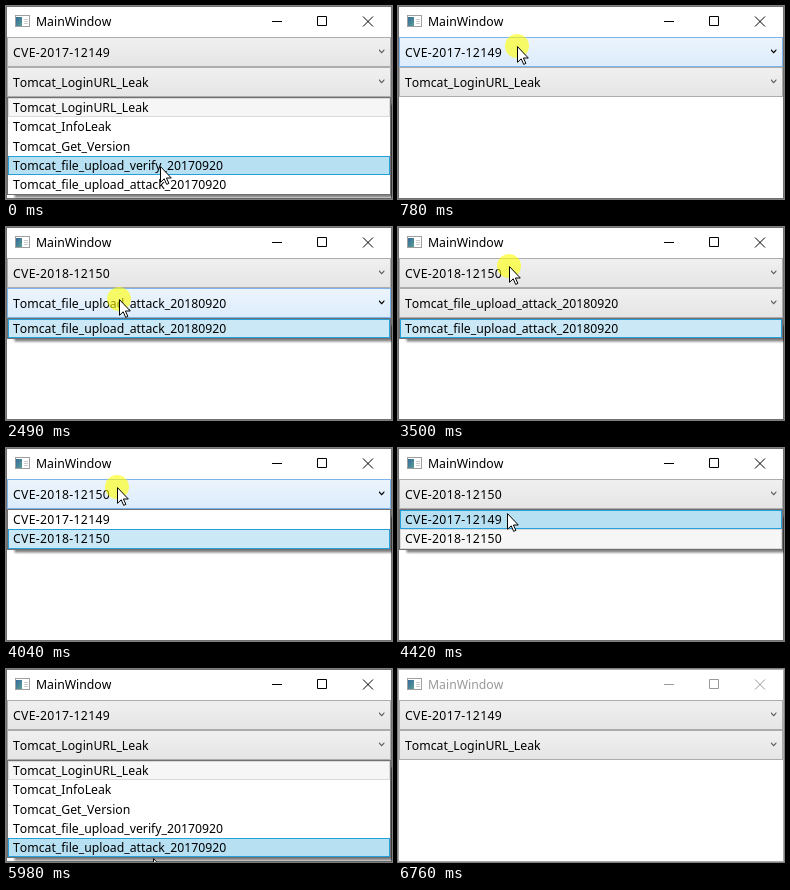
Write an HTML page that moves like this. It is 386 px wide and 193 px high and loops after 6820 ms.

```html
<!DOCTYPE html>
<html lang="en">
<head>
<meta charset="utf-8">
<title>MainWindow</title>
<style>
html, body { margin: 0; width: 100%; height: 100%; overflow: hidden; background: #fff; }
svg { display: block; width: 386px; height: 193px; }
text { font: 12.25px "Noto Sans", "Open Sans", sans-serif; font-kerning: none; white-space: pre; }
.cve { letter-spacing: .3px; }
</style>
</head>
<body>
<svg viewBox="0 0 386 193">
  <defs>
    <linearGradient id="plain" x2="0" y2="1"><stop stop-color="#f0f0f0"/><stop offset="1" stop-color="#e5e5e5"/></linearGradient>
    <linearGradient id="hover" x2="0" y2="1"><stop stop-color="#ecf4fc"/><stop offset="1" stop-color="#dcecfc"/></linearGradient>
    <linearGradient id="pane" x2="1" y2="1"><stop stop-color="#35689c"/><stop offset="1" stop-color="#5b9f94"/></linearGradient>
    <filter id="blur" x="-5%" y="-50%" width="110%" height="200%"><feGaussianBlur stdDeviation="1.3"/></filter>
  </defs>
  <rect width="386" height="193" fill="#fff"/>
  <g id="frame" fill="none">
    <rect id="edge" x=".5" y=".5" width="385" height="192"/>
    <path id="buttons" d="M266 15.5h10M311.5 10.5h9v9h-9zM357 10.5l10 10m0-10l-10 10"/>
    <text id="title" x="30" y="20">MainWindow</text>
    <rect x="9.5" y="9.5" width="14" height="11" fill="#fff" stroke="#a0a0a0"/>
    <rect x="10" y="11" width="6" height="9" fill="url(#pane)"/>
    <path d="M18 13.5h4m-4 2h4m-4 2h4" stroke="#ccc"/>
  </g>
  <g id="boxes"></g>
  <g id="popup"></g>
  <circle id="click" r="12" fill="#ff0" fill-opacity=".6"/>
  <path id="cursor" d="M.5.6V16.3L4.2 12.8 6.7 18.4 8.9 17.4 6.4 12H11.3Z" fill="#fff" stroke="#000"/>
</svg>
<script>
const LOOP = 6820, STEP = 78, HOLD = 155;
const BOX_TOP = 31, BOX_H = 30, ITEM = 19.27;
const $ = id => document.getElementById(id);
const rowTop = i => Math.round(i * ITEM);
const boxTop = i => BOX_TOP + i * BOX_H;

const cves = ["CVE-2017-12149", "CVE-2018-12150"];
const plugins = [
  ["Tomcat_LoginURL_Leak", "Tomcat_InfoLeak", "Tomcat_Get_Version",
   "Tomcat_file_upload_verify_20170920", "Tomcat_file_upload_attack_20170920"],
  ["Tomcat_file_upload_attack_20180920"]
];

// The session: every call records a change of state or a pointer glide
const changes = [], glides = [];
const at = (t, change) => changes.push({ t, change });
const glide = (start, end, x, y) => glides.push({ start, end, x, y });
const press = (t, hold = HOLD) => { at(t, { down: true }); at(t + hold, { down: false }); };
const open = (t, which) => { press(t); at(t + STEP, { list: which }); };
const pick = (t, cve) => { press(t); at(t + HOLD, { list: null, cve }); };

at(0, { x: 154, y: 160, list: 1, cve: 0, down: false, active: true });
glide(70, 470, 119, 40);
press(780, 90);
at(780, { list: null });
glide(1010, 1100, 117, 42);
open(1240, 0);
glide(1480, 1710, 113, 83);
pick(1860, 1);
glide(2170, 2330, 113, 72);
open(2410, 1);
glide(2950, 3420, 111, 39);
press(3500);
at(3560, { list: null });
open(3960, 0);
glide(4270, 4420, 109, 65);
pick(4740, 0);
glide(5120, 5200, 109, 80);
open(5350, 1);
glide(5830, 6130, 150, 196);
at(6760, { list: null, active: false });
changes.sort((a, b) => a.t - b.t);

function stateAt(t) {
  const s = {};
  for (const c of changes) if (c.t <= t) Object.assign(s, c.change);
  for (const g of glides) {
    if (g.start > t) break;
    // The pointer is seen in even steps and slows down on arrival
    const gaps = Math.round((g.end - g.start) / STEP);
    const done = Math.floor((t - g.start) / (g.end - g.start) * gaps + 1e-6) + 1;
    const u = Math.min(1, done / (gaps + 1));
    const ease = 1 - (1 - u) ** 3;
    s.x += (g.x - s.x) * ease;
    s.y += (g.y - s.y) * ease;
  }
  s.x = Math.round(s.x);
  s.y = Math.round(s.y);
  return s;
}

function rect(y, x, w, h, fill, stroke) {
  return `<rect x="${x + .5}" y="${y + .5}" width="${w - 1}" height="${h - 1}" fill="${fill}" stroke="${stroke}"/>`;
}

function label(s, y) {
  const cls = s.startsWith("CVE") ? ' class="cve"' : "";
  return `<text x="7" y="${y}"${cls}>${s}</text>`;
}

function box(i, s, hot) {
  const top = boxTop(i);
  return rect(top, 1, 384, BOX_H, `url(#${hot ? "hover" : "plain"})`, hot ? "#7eb4ea" : "#acacac") +
    label(s, top + 20) +
    `<path transform="translate(373 ${top + 13.8})" d="M0 0l2.67 2.67L5.33 0v-1.78L2.67.89 0-1.78Z"
      fill="${hot ? "#000" : "#606060"}"/>`;
}

function itemColors(selected, lit, over) {
  if (selected && over) return ["#d1e8ff", "#66a7e8"];
  if (selected && lit) return ["#cbe8f6", "#26a0da"];
  if (lit) return ["#b7e0f3", "#26a0da"];
  return selected ? ["#f6f6f6", "#dadada"] : null;
}

function list(top, items, chosen, y) {
  const h = rowTop(items.length) + 2;
  const row = Math.floor((y - top - 1) / ITEM);
  const lit = row < 0 ? chosen : Math.min(row, items.length - 1);
  let out = `<rect x="8.5" y="${top + 7.5}" width="390" height="${h - 5}" fill-opacity=".5" filter="url(#blur)"/>` +
    rect(top, 1, 384, h, "#fff", "#707070");
  items.forEach((s, i) => {
    const iy = top + 1 + rowTop(i);
    const colors = itemColors(i === chosen, i === lit, i === row);
    if (colors) out += rect(iy, 2, 382, rowTop(i + 1) - rowTop(i), ...colors);
    out += label(s, iy + 14);
  });
  return out;
}

function draw(t) {
  const { x, y, list: shown, cve, down, active } = stateAt(t);
  const names = plugins[cve];
  const hot = i => active && (shown === null || shown === i) && y >= boxTop(i) && y < boxTop(i + 1);

  const ink = active ? "#000" : "#999";
  $("edge").setAttribute("stroke", active ? "#707070" : "#aaa");
  $("buttons").setAttribute("stroke", ink);
  $("title").setAttribute("fill", ink);

  $("boxes").innerHTML = box(0, cves[cve], hot(0)) + box(1, names[0], hot(1));
  $("popup").innerHTML = shown === null ? "" :
    shown ? list(boxTop(2), names, 0, y) : list(boxTop(1), cves, cve, y);

  for (const [id, on] of [["click", down], ["cursor", active]]) {
    $(id).setAttribute("transform", `translate(${x} ${y})`);
    $(id).style.display = on ? "" : "none";
  }
}

const begin = performance.now();
function tick() {
  draw((performance.now() - begin) % LOOP);
  requestAnimationFrame(tick);
}
tick();
</script>
</body>
</html>
```
